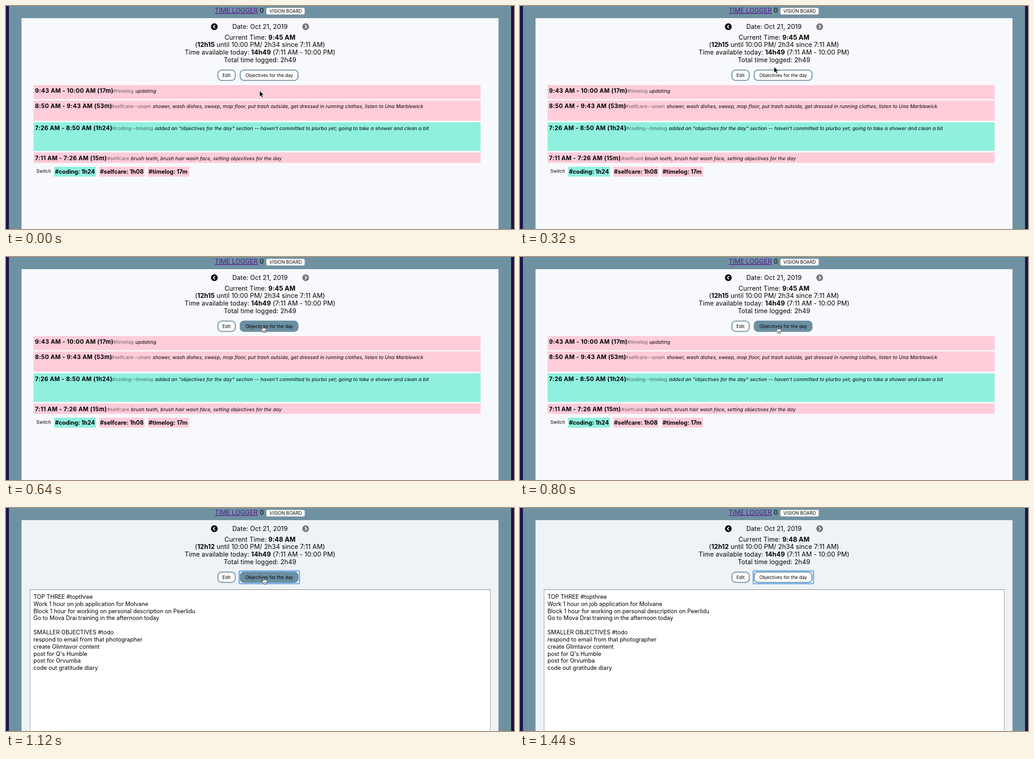
Write an HTML page that moves like this. It is 1129 px wide and 496 px high and loops after 2240 ms.

```html
<!DOCTYPE html>
<html lang="en">
<head>
<meta charset="utf-8">
<title>Time log</title>
<style>
  html, body { margin: 0; width: 100%; height: 100%; overflow: hidden; background: #6f92a2; }
  svg { display: block; font-family: Inter, sans-serif; }
  .head { font-size: 14.2px; }
  .mid { text-anchor: middle; }
  .head .mid { letter-spacing: .1px; }
  .bold { font-weight: 700; }
  .label { font-size: 12.8px; font-weight: 700; }
  .span { font-size: 13px; font-weight: 700; letter-spacing: .37px; }
  .small { font-size: 10px; letter-spacing: .1px; }
  .tag, .note { font-size: 10.9px; letter-spacing: .09px; }
  .tag { fill-opacity: .55; }
  .note { font-style: italic; }
  .button { fill: #fff; stroke: #6a8fa1; stroke-width: 2; }
  #goalText { font-size: 12.65px; }
</style>
</head>
<body>
<svg width="1129" height="496" viewBox="0 0 1129 496">
  <rect width="1129" height="496" fill="#6f92a2"/>
  <path d="M0 0H6.5V496H0ZM1122.5 0H1129V496H1122.5Z" fill="#1b1249"/>
  <rect id="panel" x="34.5" y="27" width="1060" height="470"/>

  <g class="head">
    <text x="464" y="15" fill="#551a8b" text-decoration="underline">TIME LOGGER</text>
    <text x="564" y="15">0</text>
    <g class="mid">
      <text x="564.5" y="51">Date: Oct 21, 2019</text>
      <text x="564.5" y="74.5">Current Time: <tspan class="bold" id="now"></tspan></text>
      <text x="564.5" y="91.2">(<tspan class="bold" id="left"></tspan> until 10:00 PM/ 2h34 since 7:11 AM)</text>
      <text x="564.5" y="108">Time available today: <tspan class="bold">14h49</tspan> (7:11 AM - 10:00 PM)</text>
      <text x="564.5" y="124.7">Total time logged: 2h49</text>
    </g>
  </g>
  <rect x="578.5" y="4" width="85.5" height="15" rx="3" fill="#fff" stroke="#a5adb3"/>
  <text class="small mid" x="621.5" y="15">VISION BOARD</text>

  <circle cx="463" cy="46" r="7.5"/>
  <circle cx="666" cy="46" r="7.5" fill="#777"/>
  <path d="M464.6 42.2L460.8 46L464.6 49.8M664.4 42.2L668.2 46L664.4 49.8" fill="none" stroke="#f8f9fc" stroke-width="2"/>

  <rect class="button" x="471" y="142.5" width="38.5" height="23" rx="8"/>
  <text class="small mid" x="490" y="158">Edit</text>
  <rect id="focus" x="518.3" y="140" width="133.8" height="28.3" rx="2" fill="#fff" stroke="#7ab0f4" stroke-width="3"/>
  <rect id="goalButton" class="button" x="520.5" y="142.5" width="128.5" height="23" rx="8"/>
  <text class="small mid" x="585" y="158">Objectives for the day</text>

  <g id="log"><text class="small" x="67.5" y="371">Switch</text></g>
  <g id="goals">
    <rect x="53.5" y="181.5" width="1023" height="330" fill="#fff" stroke="#999"/>
    <path d="M53 181.5H1077" stroke="#777"/>
    <g id="goalText"></g>
  </g>

  <path id="arrow" d="M0 0V13.3L3 10.5L5.2 15.4L7.5 14.4L5.3 9.6H9.5Z" stroke="#fff" stroke-width=".9"/>
  <g id="hand" fill="#fff" stroke="#111" stroke-width=".9" stroke-linejoin="round">
    <path d="M3.5 8.5V1.8a1.2 1.2 0 0 1 2.4 0V6a1.2 1.2 0 0 1 2.3.2a1.2 1.2 0 0 1 2.2.4a1.1 1.1 0 0 1 2.1.5V10L11 13V15H5L4.6 13.3L.8 8.9a1.2 1.2 0 0 1 1.7-1.6Z"/>
    <path d="M6.2 10V13M8 10V13M9.8 10V13" stroke-width=".7"/>
  </g>
  <g id="click" fill="none">
    <circle cx="575" cy="162" r="14.3" stroke="#fff" stroke-width="3.6"/>
    <circle cx="575" cy="162" r="14.5" stroke="#222" stroke-width="1.5"/>
  </g>
</svg>
<script>
const $ = id => document.getElementById(id);
const PINK = '#ffccd9', TEAL = '#8ff0de';

function add(parent, tag, attrs, text = '') {
  const node = document.createElementNS('http://www.w3.org/2000/svg', tag);
  for (const key in attrs) node.setAttribute(key, attrs[key]);
  node.textContent = text;
  $(parent).append(node);
}

function entry(y, height, fill, time, tagX, tag, noteX, note) {
  const base = y + 16.9;
  add('log', 'rect', { x: 61.3, y, width: 993.4, height, fill });
  add('log', 'text', { x: 64.5, y: base, class: 'span' }, time);
  add('log', 'text', { x: tagX, y: base, class: 'tag' }, tag);
  add('log', 'text', { x: noteX, y: base, class: 'note' }, note);
}

function chip(x, width, fill, text) {
  add('log', 'rect', { x, y: 357.5, width, height: 22, fill });
  add('log', 'text', { x: x + 2, y: 372.5, class: 'label' }, text);
}

entry(176, 31, PINK, '9:43 AM - 10:00 AM (17m)', 238, '#timelog', 287.5, 'updating');
entry(210.2, 44.8, PINK, '8:50 AM - 9:43 AM (53m)', 234, '#selfcare--unam', 326,
  'shower, wash dishes, sweep, mop floor, put trash outside, get dressed in running clothes, listen to Una Marblewick');
entry(258.7, 63.5, TEAL, '7:26 AM - 8:50 AM (1h24)', 235.5, '#coding--timelog', 331,
  'added an "objectives for the day" section -- haven\'t committed to plurbo yet; going to take a shower and clean a bit');
entry(325.8, 23.2, PINK, '7:11 AM - 7:26 AM (15m)', 225, '#selfcare', 277.5,
  'brush teeth, brush hair wash face, setting objectives for the day');
chip(107, 93, TEAL, '#coding: 1h24');
chip(207, 101, PINK, '#selfcare: 1h08');
chip(315, 92, PINK, '#timelog: 17m');

`TOP THREE #topthree
Work 1 hour on job application for Molvane
Block 1 hour for working on personal description on Peerlidu
Go to Mova Drai training in the afternoon today

SMALLER OBJECTIVES #todo
respond to email from that photographer
create Glimtavor content
post for Q's Humble
post for Orvumba
code out gratitude diary`.split('\n').forEach((line, i) =>
  add('goalText', 'text', { x: 61, y: 202 + i * 15.83 }, line));

// The pointer is sampled every 160 ms, then rests off screen
const STEP = 160, LOOP = 2240;
const pointer = [
  ['arrow', 563.7, 188.5], ['arrow', 561.7, 131.8], ['arrow', 564.7, 135.3], ['arrow', 567.7, 147],
  ['hand', 566, 152.5], ['hand', 568, 154.5], ['hand', 568, 154.5], ['hand', 568, 154.5],
  ['arrow', 574.7, 210.5]
];

const show = (id, on) => $(id).setAttribute('visibility', on ? 'visible' : 'hidden');

function draw(time) {
  const step = Math.floor(time % LOOP / STEP);
  const [shape, x, y] = pointer[step] || [];
  const open = step >= 7;
  for (const id of ['arrow', 'hand']) {
    show(id, id === shape);
    if (id === shape) $(id).setAttribute('transform', `translate(${x} ${y})`);
  }
  show('click', step === 6);
  show('focus', step >= 6);
  show('log', !open);
  show('goals', open);
  $('goalButton').style.fill = shape === 'hand' ? '#6a8fa1' : '#fff';
  $('panel').setAttribute('fill', open ? '#f0f3f6' : '#f8f9fc');
  $('now').textContent = open ? '9:48 AM' : '9:45 AM';
  $('left').textContent = open ? '12h12' : '12h15';
}

const start = performance.now();
function tick() {
  draw(performance.now() - start);
  requestAnimationFrame(tick);
}
tick();
</script>
</body>
</html>
```
